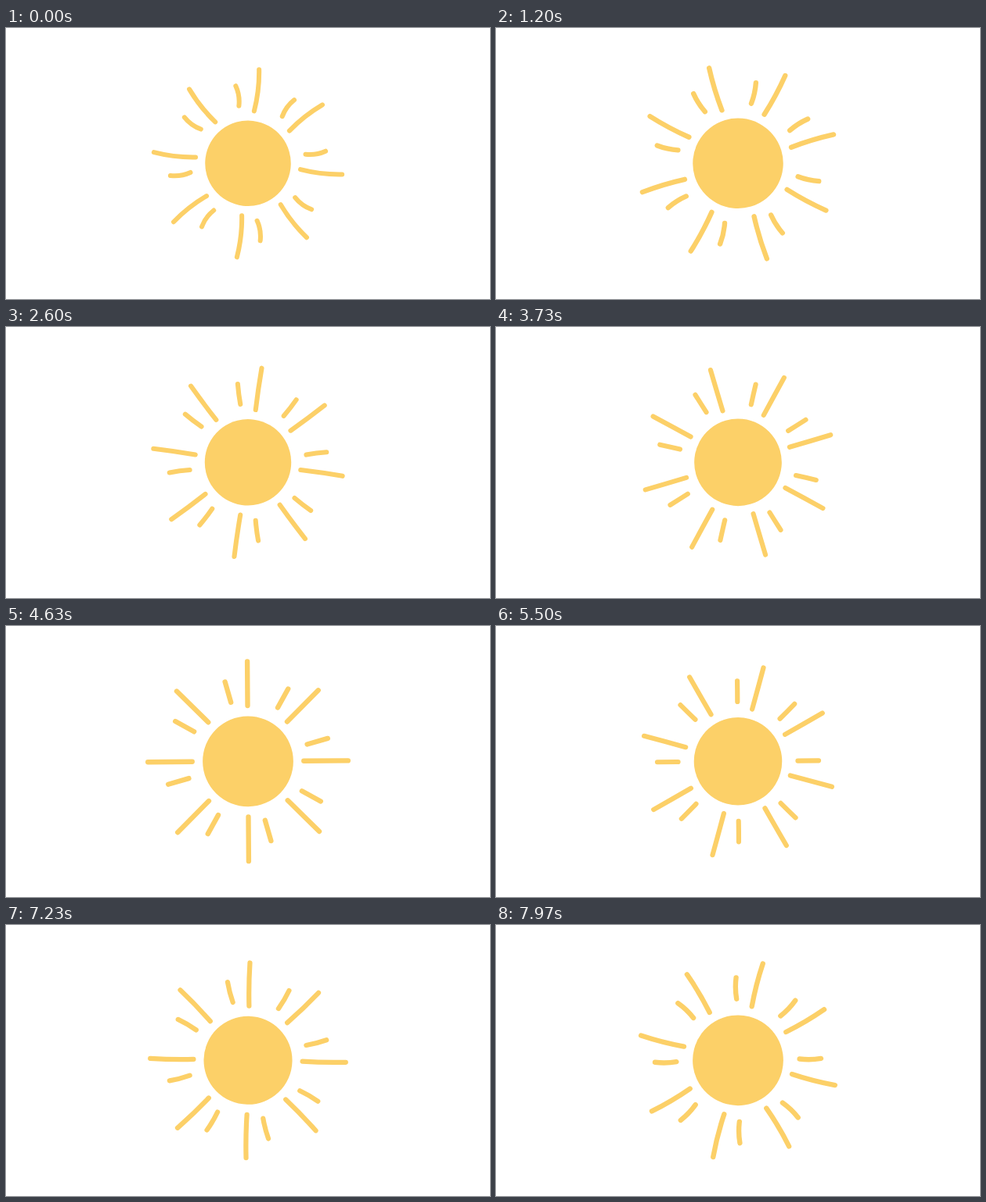
These frames come from a looping animation (618x347 px, 8000 ms). An HTML page:

```html
<!DOCTYPE html>
<html lang="en">
<head>
<meta charset="utf-8">
<title>Sun</title>
<style>
  html, body { margin: 0; width: 100%; height: 100%; overflow: hidden; background: #fff; }
  svg { display: block; width: 100%; height: 100%; }
</style>
</head>
<body>
<svg viewBox="0 0 618 347">
  <g id="sun" fill="#fcd068">
    <circle r="54.6"/>
    <path id="rays" fill="none" stroke="#fcd068" stroke-width="6" stroke-linecap="round"/>
  </g>
</svg>
<script>
const LOOP = 8;            // seconds
const SPIN = 17.9;         // degrees per second
const START_ANGLE = 6.7;
const PULSE = 3.27;        // seconds from one smallest size to the next
const LONG = { inner: 67.2, outer: 120.6, offset: 0 };
const SHORT = { inner: 74.2, outer: 100, offset: -15.7 };
const BEND_SIDES = [1, -1, 1, 1, -1, 1, -1, -1];

const sun = document.getElementById('sun');
const rays = document.getElementById('rays');
const smooth = u => u * u * (3 - 2 * u);

// A point at a distance from the centre, shifted sideways from the ray's axis.
function point(degrees, radius, side = 0) {
  const a = degrees * Math.PI / 180, sin = Math.sin(a), cos = Math.cos(a);
  return `${(radius * sin + side * cos).toFixed(2)} ${(side * sin - radius * cos).toFixed(2)}`;
}

function ray({ inner, outer, offset }, index, bend) {
  const angle = index * 45 + offset;
  const middle = point(angle, (inner + outer) / 2, bend * BEND_SIDES[index]);
  return `M${point(angle, inner)}Q${middle} ${point(angle, outer)}`;
}

function draw(t) {
  const phase = (t + 0.22) / PULSE % 1;
  const scale = 1 + 0.06 * smooth(1 - Math.abs(1 - 2 * phase));
  const angle = START_ANGLE + SPIN * t;

  // The rays straighten out, then curve the other way.
  const u = 1 - t / 4.6;
  const bend = 3.6 * u * Math.abs(u);

  sun.setAttribute('transform', `translate(309 173.3) rotate(${angle}) scale(${scale})`);
  rays.setAttribute('d', BEND_SIDES.map((_, i) => ray(LONG, i, bend) + ray(SHORT, i, bend)).join(''));
}

function tick() {
  draw(performance.now() / 1000 % LOOP);
  requestAnimationFrame(tick);
}
tick();
</script>
</body>
</html>
```
